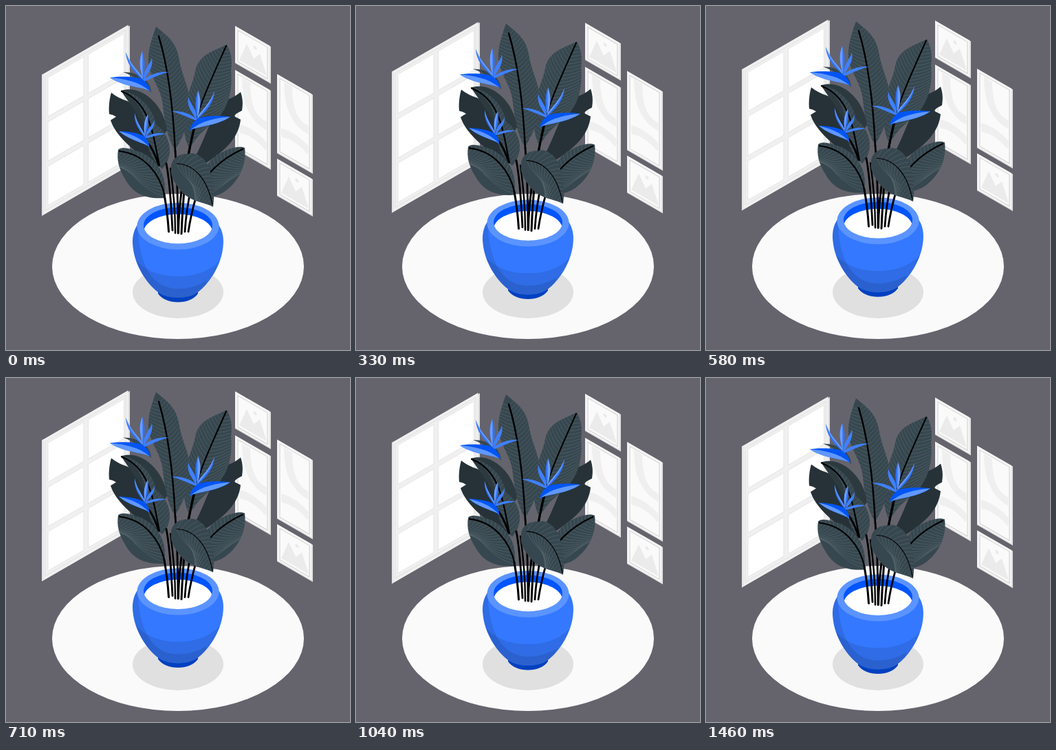
Write an HTML page that moves like this. It is 500x500 px and loops after 1500 ms.

```html
<!DOCTYPE html>
<html lang="en">
<head>
<meta charset="utf-8">
<title>Floating plant</title>
<style>
  html, body { margin: 0; width: 100%; height: 100%; overflow: hidden; background: #65646d; }
  svg { display: block; width: 100%; height: 100%; }
</style>
</head>
<body>
<svg viewBox="0 0 500 500">
  <defs>
    <clipPath id="hole"><ellipse cx="250" cy="319" rx="50" ry="26.500"/></clipPath>
    <clipPath id="body"><path id="pot" d="M191 318C185 327 183 338 184.500 350C187 376 203 402 221 416Q232 424 250 424Q268 424 279 416C297 402 313 376 315.500 350C317 338 315 327 309 318Z"/></clipPath>
    <g id="flower">
      <path d="M-26-36C-25-18-12-4 0 5C-3-6-17-13-26-36Z" fill="#2f74ff"/>
      <path d="M-26-36C-22-18-10-8 0 5C-3-6-17-13-26-36Z" fill="#6a9dff"/>
      <path d="M-2-37C-8-22-5-10-1 3C1-8 4-20-2-37Z" fill="#2f74ff"/>
      <path d="M-2-37C-8-22-5-10-1 3C-2-10-1-22-2-37Z" fill="#6a9dff"/>
      <path d="M12-28C10-18-2-10 0 7C4-4 15-12 12-28Z" fill="#3f80ff"/>
      <path d="M36-7C24-8 12-5 0 4V7C10 3 22-3 36-7Z" fill="#3f80ff"/>
      <path d="M-49 1C-34-1-14-1-3 3C4 7 9 14 10 21C2 15-28 15-49 1Z" fill="#0055f5"/>
      <path d="M-49 1C-28 3-8 6 10 21C2 15-28 15-49 1Z" fill="#6098ff"/>
    </g>
  </defs>

  <ellipse cx="250" cy="378.500" rx="183" ry="105.500" fill="#fafafa"/>
  <ellipse cx="250" cy="416" rx="66" ry="38" fill="#e0e0e0"/>

  <g id="float">
    <g id="wall"></g>
    <path d="M221 413V418C226 426 238 430.500 250 430.500S274 426 279 418V413Z" fill="#0041c0"/>
    <use href="#pot" fill="#3478ff"/>
    <g clip-path="url(#body)" fill="#000" fill-opacity=".1">
      <path d="M180 358Q202 393 250 393Q298 393 320 358V430H180Z"/>
      <path d="M180 315H192C191 360 205 412 252 411Q272 411 292 399L280 430H180Z"/>
    </g>
    <ellipse cx="250" cy="320" rx="59.500" ry="34" fill="#5b94ff"/>
    <g clip-path="url(#hole)">
      <path d="M190 285H310V350H190Z" fill="#0055fb"/>
      <ellipse cx="250" cy="329" rx="50" ry="26.500" fill="#fff"/>
    </g>
    <g id="plant" stroke-linecap="round"></g>
  </g>
</svg>

<script>
const $ = id => document.getElementById(id);
const rect = (x, y, w, h, fill, extra = '') =>
  `<rect x="${x}" y="${y}" width="${w}" height="${h}" fill="${fill}" ${extra}/>`;
const line = (d, width, color = '#000') =>
  `<path d="${d}" fill="none" stroke="${color}" stroke-width="${width}"/>`;
const slanted = (x, y, slope, content) =>
  `<g transform="matrix(1 ${slope} 0 1 ${x} ${y})">${content}</g>`;

function windowPanes() {
  let s = rect(2, 2, 126, 203, '#e0e0e0') + rect(0, 0, 125.5, 205, '#f0f0f0') +
    rect(0, 0, 2.5, 205, '#e3e3e3') + rect(5, 5, 117, 195, 'none', 'stroke="#dcdcdc" stroke-width=".8"');
  for (const y of [9, 73.5, 138])
    for (const x of [9, 67.5])
      s += rect(x, y, 52, 57, '#fff', 'stroke="#e0e0e0" stroke-width=".8"');
  return slanted(52, 100, -0.577, s);
}

const mountains = `<path d="M6 46L17 16L27 32L36 20L46 46Z" fill="#ebebeb"/>
  <circle cx="29" cy="15" r="2.600" fill="#ebebeb"/>`;
const arcs = `<path d="M16 6C16 42 26 57 47 55" fill="none" stroke="#efefef" stroke-width="12"/>
  <path d="M5 82C20 76 35 78 47 86" fill="none" stroke="#efefef" stroke-width="12"/>`;

function picture(x, y, h, art) {
  return slanted(x, y, 0.577,
    rect(0, 0, 52, h, '#e0e0e0') + rect(0, 0, 50, h - 1.5, '#f5f5f5') +
    rect(4, 4, 43, h - 8.5, '#fafafa', 'stroke="#cfcfcf" stroke-width="1"') +
    `<svg x="6" y="6" width="39.5" height="${h - 12}" viewBox="6 6 39.5 ${h - 12}">${art}</svg>`);
}

$('wall').innerHTML = windowPanes() +
  picture(333, 29, 54, mountains) + picture(333, 93, 115, arcs) +
  picture(394, 99, 115, arcs) + picture(394, 222, 54, mountains);

// Veins branch from both sides of the rib, which runs from base to tip.
function veins(ribPath) {
  const rib = document.createElementNS('http://www.w3.org/2000/svg', 'path');
  rib.setAttribute('d', ribPath);
  let d = '';
  for (let at = 0; at < rib.getTotalLength() - 1; at += 6) {
    const a = rib.getPointAtLength(at), b = rib.getPointAtLength(at + 1);
    const angle = Math.atan2(b.y - a.y, b.x - a.x);
    for (const side of [-1, 1]) {
      const point = (r, turn) => {
        const t = angle + side * turn;
        return `${(a.x + r * Math.cos(t)).toFixed(1)} ${(a.y + r * Math.sin(t)).toFixed(1)}`;
      };
      d += `M${a.x.toFixed(1)} ${a.y.toFixed(1)}Q${point(22, 1.15)} ${point(52, 0.8)}`;
    }
  }
  return line(d, 0.55, '#5c6c73');
}

let leaves = 0;
function leaf(outline, rib, width = 2.2) {
  const id = 'leaf' + leaves++;
  return `<clipPath id="${id}"><path d="${outline}"/></clipPath><path d="${outline}" fill="#37474f"/>
    <g clip-path="url(#${id})">${veins(rib)}</g>${line(rib, width)}`;
}
const shape = (d, fill) => `<path d="${d}" fill="${fill}"/>`;
const flower = transform => `<use href="#flower" transform="${transform}"/>`;

$('plant').innerHTML =
  shape('M153 126C150 136 149 148 150 157Q156 158 160 161L152 166C159 188 183 209 222 236C220 200 199 147 176 138Q163 134 153 126Z', '#263238') +
  shape('M341 125C345 136 344 145 343 152Q336 155 331 160L341 165C338 193 318 211 282 234L272 225C292 190 302 144 322 136Q333 132 341 125Z', '#263238') +
  leaf('M321 56C328 69 329 80 327 94C329 118 326 141 310 161C293 177 276 188 267 208C257 190 257 169 262 142C265 121 272 112 275 95C280 70 301 66 321 56Z',
    'M267 208C272 160 298 108 320 58', 2) +
  leaf('M218 30C235 44 248 52 252 79C256 102 268 121 268 146C268 171 255 192 246 210C235 193 231 171 228 145C226 119 209 104 207 82C206 64 212 47 218 30Z',
    'M246 212C243 150 237 93 222 44', 2.4) +
  shape('M170 96C194 96 211 109 211 126C201 114 188 102 170 96Z', '#37474f') +
  shape('M167 123C200 113 231 148 234 181L220 200Z', '#2c3a40') +
  leaf('M167 123C194 126 215 151 218 172C232 182 239 199 238 212Q237 226 227 237C211 222 204 206 205 185C203 160 193 135 167 123Z',
    'M223 232C214 189 210 140 168 124', 2.2) +
  line('M208 201Q216 213 222 231', 3) +
  line('M274 176C264 220 251 270 250.500 330', 3) +
  leaf('M163 209C168 203 182 208 195 212C216 221 236 242 230 279C204 281 185 273 174 253C163 236 161 222 163 209Z',
    'M231 277C224 244 201 215 165 211', 2.2) +
  leaf('M347 206C350 231 339 254 319 269Q305 279 284 278L274 279C278 254 287 232 307 216C322 208 337 202 347 206Z',
    'M275 279C285 247 313 222 344 208', 2.2) +
  line('M236.500 328Q235 302 230 274', 3) +
  line('M242 326C240 292 239 260 233 229', 2.8) +
  line('M246 330C246 296 243 265 239 236', 2.4) +
  line('M246 210C249 250 250 290 250 330', 2.8) +
  line('M267 207C260 244 257 285 255 331', 3) +
  line('M260 328Q262 296 269 265', 2.8) +
  line('M265 328Q269 302 276 278', 2.8) +
  leaf('M240 235C240 221 252 214 265 215C273 211 293 219 298 245C303 261 303 277 301 292C286 284 266 285 252 266C243 254 238 245 240 235Z',
    'M248 229C274 230 293 252 300 289', 1.2) +
  flower('translate(200 103)') +
  flower('translate(277 160) scale(-1 1)') +
  flower('translate(203 187) rotate(9) scale(.8)');

const PERIOD = 1500, RISE = 10;
function draw(now) {
  const phase = now % PERIOD / PERIOD;
  const y = -RISE * (1 - Math.abs(1 - 2 * phase));
  $('float').setAttribute('transform', `translate(0 ${y.toFixed(3)})`);
  requestAnimationFrame(() => draw(performance.now()));
}
draw(performance.now());
</script>
</body>
</html>
```
